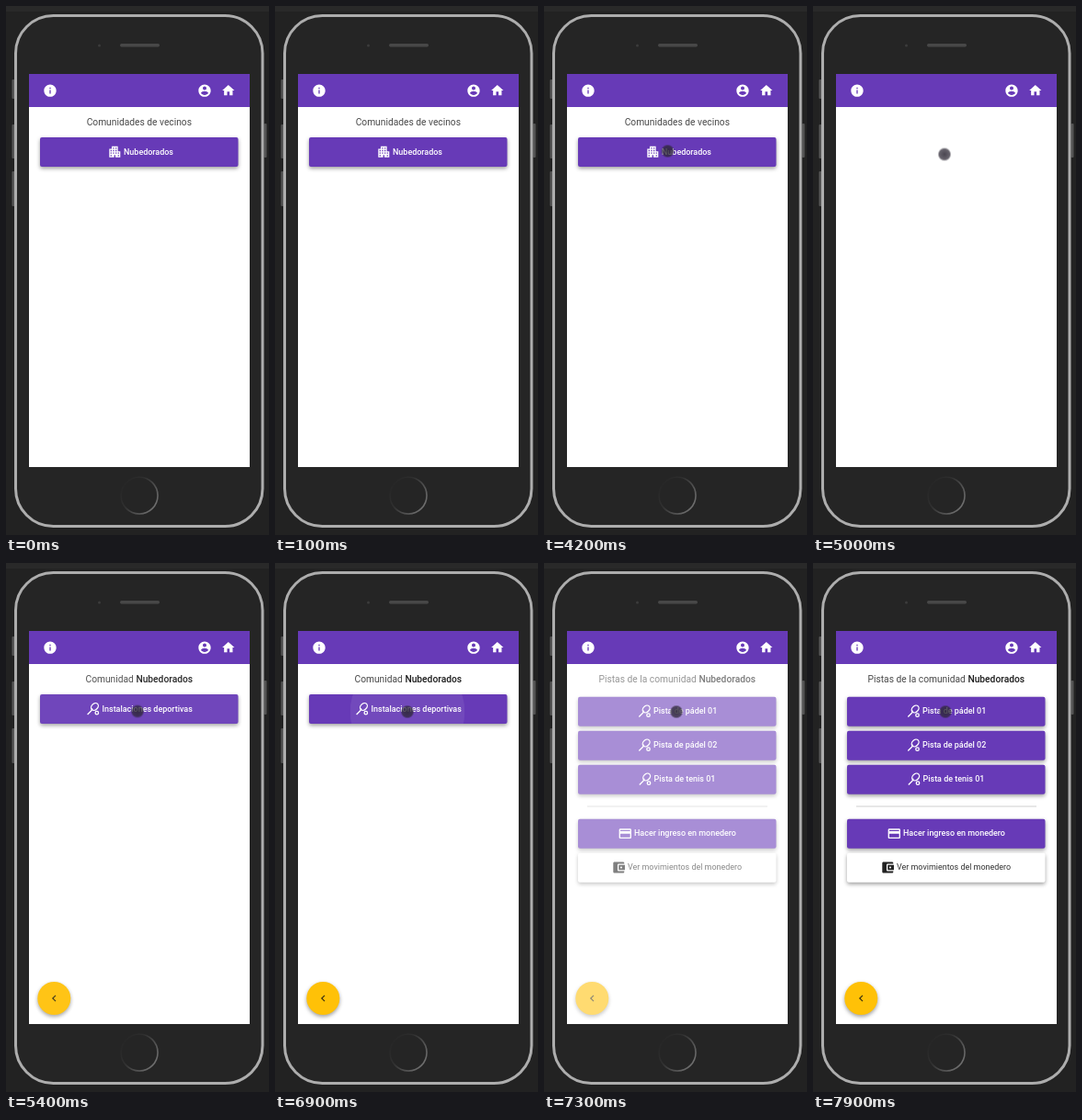
Animation, 286 px wide and 576 px high, one loop 8000 ms. Source, as an HTML page:

```html
<!DOCTYPE html>
<html lang="es">
<head>
<meta charset="utf-8">
<title>Comunidades de vecinos</title>
<style>
  html, body { margin: 0; width: 100%; height: 100%; overflow: hidden; background: #222; }
  svg { display: block; }
  text { font-family: Roboto, Arial, sans-serif; font-size: 8.96px; }
  .title { font-size: 10.24px; fill: #484848; text-anchor: middle; }
  .title tspan { font-weight: 500; fill: #1c1c1c; }
  .label { font-weight: 500; fill: #fff; }
  .raised { filter: drop-shadow(0 2px 2px rgba(0, 0, 0, .38)); }
  .line { fill: none; stroke: currentColor; stroke-width: 2; }

  .page, .cursor, .ripple { animation: 8s linear infinite; }
  .home { animation-name: home; }
  .club { animation-name: club; }
  .courts { animation-name: courts; }
  .cursor { animation-name: cursor; }
  .ripple { fill: #fff; transform-box: fill-box; transform-origin: center; opacity: 0; }
  .tap1 { animation-name: tap1; }
  .tap2 { animation-name: tap2; }

  @keyframes home {
    0%, 62.49% { opacity: 1; }
    62.5%, 100% { opacity: 0; }
  }
  @keyframes club {
    0% { opacity: 0; }
    62.5% { opacity: 0; animation-timing-function: ease-out; }
    68.75%, 88.74% { opacity: 1; }
    88.75%, 100% { opacity: 0; }
  }
  @keyframes courts {
    0% { opacity: 0; }
    88.75% { opacity: 0; animation-timing-function: ease-out; }
    95%, 100% { opacity: 1; }
  }
  @keyframes cursor {
    0%, 41.24% { opacity: 0; transform: translate(142px, 103px); }
    41.25% { opacity: 1; transform: translate(142px, 103px); animation-timing-function: ease-in-out; }
    51.25%, 53.75% { opacity: 1; transform: translate(134.5px, 158px); animation-timing-function: ease-in-out; }
    58.75%, 75% { opacity: 1; transform: translate(143px, 161.5px); }
    81.25%, 100% { opacity: 1; transform: translate(144px, 162px); }
  }
  @keyframes tap1 {
    0%, 56.25% { opacity: .12; transform: scale(0); animation-timing-function: ease-out; }
    60% { opacity: .1; transform: scale(1); }
    62.5%, 100% { opacity: 0; transform: scale(1.8); }
  }
  @keyframes tap2 {
    0%, 83.75% { opacity: .12; transform: scale(0); animation-timing-function: ease-out; }
    86.25% { opacity: .08; transform: scale(1); }
    88.75%, 100% { opacity: 0; transform: scale(1.8); }
  }
</style>
</head>
<body>
<svg width="286" height="576" viewBox="0 0 286 576">
  <defs>
    <linearGradient id="ring" x1="0" y1="0" x2="1" y2=".7">
      <stop offset="0" stop-color="#222"/>
      <stop offset=".45" stop-color="#303030"/>
      <stop offset="1" stop-color="#707070"/>
    </linearGradient>
    <radialGradient id="touch">
      <stop offset="0" stop-color="#2b2633" stop-opacity=".85"/>
      <stop offset=".75" stop-color="#2b2633" stop-opacity=".72"/>
      <stop offset="1" stop-color="#2b2633" stop-opacity="0"/>
    </radialGradient>
    <clipPath id="edge"><rect x="37" y="143" width="215.5" height="32" rx="2"/></clipPath>

    <rect id="button" width="215.5" height="32" rx="2"/>
    <symbol id="info" viewBox="0 0 24 24"><path d="M12 2C6.48 2 2 6.48 2 12s4.48 10 10 10 10-4.48 10-10S17.52 2 12 2zm1 15h-2v-6h2v6zm0-8h-2V7h2v2z"/></symbol>
    <symbol id="user" viewBox="0 0 24 24"><path d="M12 2C6.48 2 2 6.48 2 12s4.48 10 10 10 10-4.48 10-10S17.52 2 12 2zm0 3c1.66 0 3 1.34 3 3s-1.34 3-3 3-3-1.34-3-3 1.34-3 3-3zm0 14.2c-2.5 0-4.71-1.28-6-3.22.03-1.99 4-3.08 6-3.08 1.99 0 5.97 1.09 6 3.08-1.29 1.94-3.5 3.22-6 3.22z"/></symbol>
    <symbol id="house" viewBox="0 0 24 24"><path d="M10 20v-6h4v6h5v-8h3L12 3 2 12h3v8z"/></symbol>
    <symbol id="flats" viewBox="0 0 24 24"><path d="M17 11V3H7v4H3v14h8v-4h2v4h8V11h-4zM7 19H5v-2h2v2zm0-4H5v-2h2v2zm0-4H5V9h2v2zm4 4H9v-2h2v2zm0-4H9V9h2v2zm0-4H9V5h2v2zm4 8h-2v-2h2v2zm0-4h-2V9h2v2zm0-4h-2V5h2v2zm4 12h-2v-2h2v2zm0-4h-2v-2h2v2z"/></symbol>
    <symbol id="racket" viewBox="0 0 24 24">
      <g class="line">
        <ellipse cx="14.5" cy="8.5" rx="5" ry="6.6" transform="rotate(45 14.5 8.5)"/>
        <path d="M2.7 21.3L9 15q1.5-1.5 1-4"/>
        <circle cx="18" cy="18.5" r="2.6"/>
      </g>
    </symbol>
    <symbol id="card" viewBox="0 0 24 24"><path d="M20 4H4c-1.11 0-1.99.89-1.99 2L2 18c0 1.11.89 2 2 2h16c1.11 0 2-.89 2-2V6c0-1.11-.89-2-2-2zm0 14H4v-6h16v6zm0-10H4V6h16v2z"/></symbol>
    <symbol id="wallet" viewBox="0 0 24 24"><path d="M21 18v1c0 1.1-.9 2-2 2H5c-1.11 0-2-.9-2-2V5c0-1.1.89-2 2-2h14c1.1 0 2 .9 2 2v1h-9c-1.11 0-2 .9-2 2v8c0 1.1.89 2 2 2h9zm-9-2h10V8H12v8zm4-2.5c-.83 0-1.5-.67-1.5-1.5s.67-1.5 1.5-1.5 1.5.67 1.5 1.5-.67 1.5-1.5 1.5z"/></symbol>
    <g id="back">
      <circle class="raised" cx="52.3" cy="474" r="18" fill="#ffc107"/>
      <path d="M54 470.8l-3.2 3.2 3.2 3.2" fill="none" stroke="#3a3010" stroke-width="1.2"/>
    </g>
  </defs>

  <!-- phone -->
  <rect width="286" height="576" fill="#222"/>
  <rect width="286" height="6" fill="#292929"/>
  <g fill="#555">
    <rect x="6.5" y="80" width="3" height="21" rx="1"/>
    <rect x="6.5" y="129" width="3" height="37" rx="1"/>
    <rect x="6.5" y="180" width="3" height="38" rx="1"/>
    <rect x="280.5" y="128" width="3" height="37" rx="1"/>
  </g>
  <rect x="10.5" y="10.5" width="268.5" height="556" rx="41" fill="#252525" stroke="#adadad" stroke-width="3"/>
  <circle cx="101.5" cy="43" r="1.5" fill="#3c3c3c"/>
  <rect x="124" y="41" width="43" height="3.5" rx="1.7" fill="#484848"/>
  <circle cx="145" cy="533" r="20" fill="none" stroke="url(#ring)" stroke-width="1.6"/>

  <!-- app -->
  <rect x="25" y="74" width="240" height="428" fill="#fff"/>
  <rect x="25" y="74" width="240" height="36" fill="#673ab7"/>
  <g fill="#fff">
    <use href="#info" x="40" y="84.2" width="16" height="16"/>
    <use href="#user" x="208" y="84.2" width="16" height="16"/>
    <use href="#house" x="233.8" y="84" width="16" height="16"/>
  </g>

  <g class="page home">
    <text class="title" x="144.8" y="130">Comunidades de vecinos</text>
    <use class="raised" href="#button" x="37" y="143" fill="#673ab7"/>
    <g clip-path="url(#edge)"><circle class="ripple tap1" cx="140" cy="160" r="62"/></g>
    <use href="#flats" x="110.3" y="150.8" width="16" height="16" fill="#fff"/>
    <text class="label" x="128" y="161.6">Nubedorados</text>
  </g>

  <g class="page club">
    <text class="title" x="144.8" y="130">Comunidad <tspan>Nubedorados</tspan></text>
    <use class="raised" href="#button" x="37" y="143" fill="#673ab7"/>
    <g clip-path="url(#edge)"><circle class="ripple tap2" cx="144" cy="162" r="62"/></g>
    <use href="#racket" x="86.8" y="150.8" width="16" height="16" color="#fff"/>
    <text class="label" x="104.5" y="161.6">Instalaciones deportivas</text>
    <use href="#back"/>
  </g>

  <g class="page courts">
    <text class="title" x="144.8" y="130">Pistas de la comunidad <tspan>Nubedorados</tspan></text>
    <g class="raised" fill="#673ab7">
      <use href="#button" x="37" y="145.7"/>
      <use href="#button" x="37" y="182.7"/>
      <use href="#button" x="37" y="219.7"/>
      <use href="#button" x="37" y="278.7"/>
      <use href="#button" x="37" y="315.7" fill="#fff"/>
    </g>
    <path d="M47 265h196" stroke="#cfcfcf"/>
    <g color="#fff">
      <use href="#racket" x="101.5" y="153.3" width="16" height="16"/>
      <use href="#racket" x="101.5" y="190.3" width="16" height="16"/>
      <use href="#racket" x="102" y="227.3" width="16" height="16"/>
    </g>
    <use href="#card" x="80.3" y="286.7" width="16" height="16" fill="#fff"/>
    <use href="#wallet" x="73.3" y="323.5" width="16" height="16" fill="#222"/>
    <g class="label">
      <text x="119" y="164.2">Pista de pádel 01</text>
      <text x="119" y="201.2">Pista de pádel 02</text>
      <text x="119.5" y="238.2">Pista de tenis 01</text>
      <text x="98" y="297.3">Hacer ingreso en monedero</text>
    </g>
    <text x="91" y="334.4" fill="#333">Ver movimientos del monedero</text>
    <use href="#back"/>
  </g>

  <g class="cursor"><circle r="7.5" fill="url(#touch)"/></g>
</svg>
</body>
</html>
```
